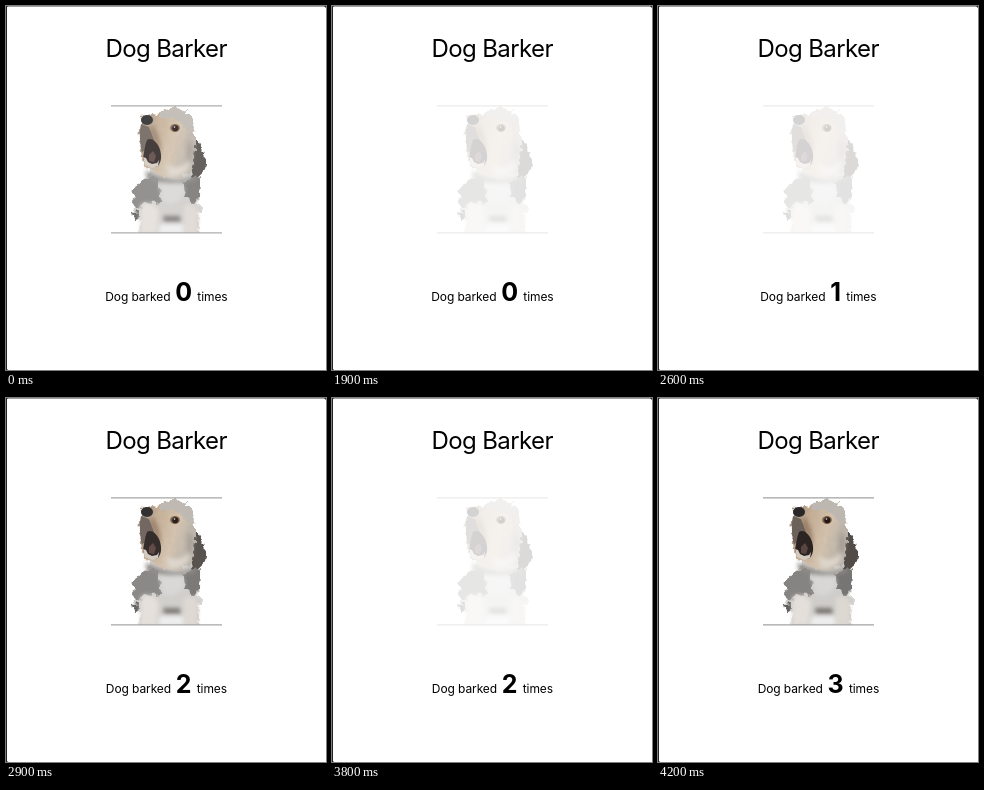
These frames come from a looping animation (320 px wide and 364 px high, 4.5 s). An HTML page:

```html
<!DOCTYPE html>
<html lang="en">
<head>
<meta charset="utf-8">
<title>Dog Barker</title>
<style>
  html, body { margin: 0; width: 100%; height: 100%; overflow: hidden; background: #fff; }
  svg { display: block; }
  text { font-family: Inter, "Liberation Sans", sans-serif; text-anchor: middle; fill: #000; }
  .title { font-size: 24px; letter-spacing: -.6px; }
  .label { font-size: 12px; letter-spacing: -.1px; }
  #count { font-size: 25px; font-weight: 700; letter-spacing: 0; }
</style>
</head>
<body>
<svg width="320" height="364" viewBox="0 0 320 364">
  <defs>
    <filter id="soft"><feGaussianBlur stdDeviation=".6"/></filter>
    <filter id="shade"><feGaussianBlur stdDeviation="2"/></filter>
    <!-- ragged, furry outlines -->
    <filter id="fur" color-interpolation-filters="sRGB">
      <feTurbulence type="fractalNoise" baseFrequency=".16" numOctaves="2" seed="4"/>
      <feDisplacementMap in="SourceGraphic" scale="9" xChannelSelector="R" yChannelSelector="G"/>
      <feGaussianBlur stdDeviation=".7"/>
    </filter>
    <clipPath id="photo"><rect x="105" y="99" width="111" height="128"/></clipPath>
    <linearGradient id="face" x1="0" y1="0" x2="1" y2=".4">
      <stop offset="0" stop-color="#8d8073"/>
      <stop offset=".35" stop-color="#c2ab92"/>
      <stop offset=".7" stop-color="#d2c1ac"/>
      <stop offset="1" stop-color="#b9b2a9"/>
    </linearGradient>
  </defs>

  <!-- window edge -->
  <path d="M.5 364V0" stroke="#222"/>
  <path d="M0 .5H320" stroke="#888" stroke-width=".8"/>
  <path d="M0 0H2L0 2ZM320 0H318L320 2ZM0 364H2L0 362Z" fill="#222"/>

  <text class="title" x="160.2" y="51">Dog Barker</text>

  <g id="dog">
    <g clip-path="url(#photo)">
      <!-- body -->
      <g filter="url(#fur)">
        <path d="M139 170C130 177 126 190 128 203C126 212 130 214 134 212L133 230H192C193 216 195 204 193 186C195 174 187 166 182 160H150Z" fill="#cfcdca"/>
        <path d="M139 172C129 178 125 186 129 191C126 200 129 204 133 203C137 194 146 198 156 196C153 186 152 177 150 172Z" fill="#858482"/>
        <path d="M176 176C184 175 190 170 193 170C196 180 195 192 189 197C183 198 179 190 176 176Z" fill="#777573"/>
        <path d="M126 206L134 205L133 213L128 214Z" fill="#5f5e5c"/>
      </g>
      <g filter="url(#shade)">
        <path d="M154 178C163 173 177 176 178 184C177 195 165 201 157 195Z" fill="#d8d7d5"/>
        <path d="M135 199C142 195 151 198 153 206L150 228H134Z" fill="#e4dfda"/>
        <path d="M178 201C184 196 192 200 192 208L191 228H178Z" fill="#ded8d2"/>
        <path d="M154 218H177V228H152Z" fill="#eee"/>
        <path d="M157 210H174L175 216H158Z" fill="#777470"/>
        <path d="M140 164C152 172 174 178 188 169L190 173C176 180 150 178 140 171Z" fill="#8d8a86"/>
      </g>

      <!-- head -->
      <g filter="url(#fur)">
        <path d="M184 131C194 131 195 142 200 154C201 164 196 170 187 173C183 160 181 142 184 131Z" fill="#514c48"/>
        <path d="M136 113C138 108 146 107 151 109L157 102L167 101L178 104L184 110L187 119C191 132 189 150 186 162C179 172 167 175 157 170C147 167 139 162 136 152C134 141 132 126 136 113Z" fill="url(#face)"/>
        <path d="M154 104L166 101L178 104L185 110L188 120C185 126 181 125 178 120C172 113 164 112 154 112Z" fill="#bcb7b0"/>
      </g>
      <g filter="url(#shade)">
        <path d="M146 119C152 124 155 135 155 148L149 138L143 126Z" fill="#9a7f68"/>
        <path d="M160 158C168 163 177 162 184 154C184 166 174 173 162 170Z" fill="#ddd5ca"/>
        <path d="M182 130L187 142L185 159L181 150Z" fill="#a49b92"/>
      </g>
      <g filter="url(#soft)">
        <path d="M135 118L143 121L148 134C145 141 139 143 136 147C134 139 133 127 135 118Z" fill="#6c625a"/>
        <path d="M141 134C145 131 150 135 153 141C156 148 156 155 152 160C145 162 139 159 137 152C138 146 139 139 141 134Z" fill="#2c2422"/>
        <path d="M143 149L147 145L150 150L148 156L143 155Z" fill="#5b4540"/>
        <path d="M137 151L140 152L142 156L146 158L151 157L153 154L152 160L146 162L139 159Z" fill="#d3cac0"/>
        <ellipse cx="141" cy="114" rx="6" ry="5" fill="#292727"/>
        <ellipse cx="169" cy="122" rx="4.8" ry="4" fill="#7a5a40"/>
        <circle cx="169.3" cy="122.3" r="3" fill="#1f1816"/>
        <circle cx="168.5" cy="121" r=".8" fill="#eee"/>
      </g>
    </g>
    <path d="M105 99.8H216M105 226.8H216" stroke="#a3a3a3" stroke-width="1.2"/>
  </g>

  <text class="label" x="160.4" y="295">Dog barked <tspan id="count" dx="1.5">0</tspan><tspan dx="2"> times</tspan></text>
</svg>
<script>
  const LOOP = 4500, STEP = 100, DIM = 0.2;
  // press and release times in ms
  const taps = [[1800, 2050], [2450, 2650], [3700, 3850]];
  const dog = document.getElementById('dog');
  const count = document.getElementById('count');

  const clamp = x => Math.min(1, Math.max(0, x));
  const ease = x => x < 0.5 ? 2 * x * x : 1 - 2 * (1 - x) ** 2;

  function opacity(t) {
    if (t < 200) return t < 100 ? 0.88 : 0.98;
    const tap = taps.filter(([down]) => t >= down).pop();
    if (!tap) return 1;
    const [down, up] = tap;
    const dim = ease(clamp((t - down) / 100)) - ease(clamp((t - up) / 300));
    return 1 - (1 - DIM) * dim;
  }

  function draw(now) {
    const t = Math.floor(now % LOOP / STEP) * STEP;
    dog.setAttribute('opacity', opacity(t));
    count.textContent = taps.filter(([, up]) => t >= up).length;
    requestAnimationFrame(draw);
  }
  draw(0);
</script>
</body>
</html>
```
